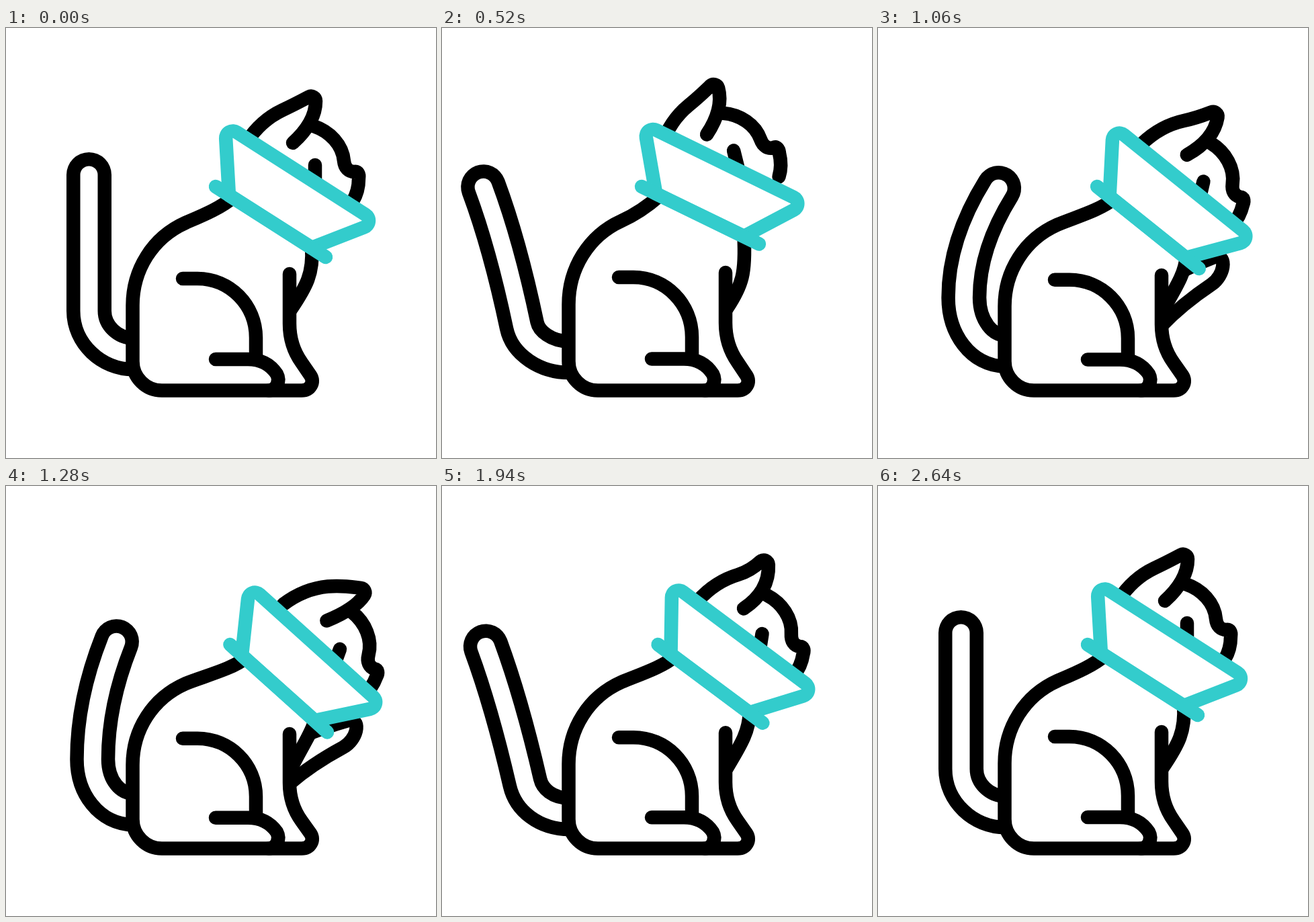
Write an HTML page with a canvas that moves like this. It is 640 by 640 pixels and loops after 2.86 s.

```html
<!DOCTYPE html>
<html>
<head>
<meta charset="utf-8">
<style>
  html, body { margin: 0; width: 100%; height: 100%; overflow: hidden; background: #fff; }
  canvas { display: block; }
</style>
</head>
<body>
<canvas id="stage" width="640" height="640"></canvas>
<script>
const ctx = document.getElementById('stage').getContext('2d');
const LOOP = 2860, LINE = 20.5, TEAL = '#33cccc';

// Key points as [time, value]; every other measure is derived from these four
const headTurn = [[205, 0], [560, -14.5], [740, -10], [840, 1], [1280, 20], [1760, 24], [2180, -14], [2640, 0]];
const earFlop = [[205, 1], [540, 0], [840, -11], [1280, 9], [1680, 14], [2000, -12], [2240, -9], [2640, 1]];
const tailSway = [[205, 0], [560, -64], [740, -42], [840, 50], [980, 58], [1280, 41], [1680, -1], [2040, -68], [2240, -42], [2640, 0]];
const pawTurn = [[640, 100], [840, -30], [1280, -22], [1680, 0], [1960, 100]];

// Monotone cubic interpolation, flat at both ends
function sample(keys, t) {
  const last = keys.length - 1;
  if (t <= keys[0][0]) return keys[0][1];
  if (t >= keys[last][0]) return keys[last][1];
  const i = keys.findIndex(k => k[0] > t) - 1;
  const rate = n => (keys[n + 1][1] - keys[n][1]) / (keys[n + 1][0] - keys[n][0]);
  const slope = n => {
    if (n === 0 || n === last) return 0;
    const a = rate(n - 1), b = rate(n);
    return a * b > 0 ? 2 * a * b / (a + b) : 0;
  };
  const [[t0, v0], [t1, v1]] = keys.slice(i, i + 2);
  const span = t1 - t0, u = (t - t0) / span, step = v1 - v0;
  const m0 = slope(i) * span, m1 = slope(i + 1) * span;
  return v0 + u * (m0 + u * (3 * step - 2 * m0 - m1 + u * (m0 + m1 - 2 * step)));
}

function stroke(color = '#000', width = LINE) {
  ctx.strokeStyle = color;
  ctx.lineWidth = width;
  ctx.stroke();
}
function fillWhite() {
  ctx.fillStyle = '#fff';
  ctx.fill();
}
function start(x, y) {
  ctx.beginPath();
  ctx.moveTo(x, y);
}
function placed(x, y, degrees, draw) {
  ctx.save();
  ctx.translate(x, y);
  ctx.rotate(degrees * Math.PI / 180);
  draw();
  ctx.restore();
}

function drawTail(sway, head) {
  const base = 485 - .06 * sway - .08 * head;
  const kneeX = 123.5 + .03 * sway + .2 * head, kneeY = 421 - .35 * sway;
  const bendX = 123.5 + .27 * sway - .0035 * sway * sway, bendY = 322;
  const reach = .55 * (base - kneeY) / (kneeY - bendY);
  start(190, base);
  ctx.bezierCurveTo(154, base, kneeX + (kneeX - bendX) * reach, kneeY + (kneeY - bendY) * reach, kneeX, kneeY);
  ctx.quadraticCurveTo(bendX, bendY, 123.5 + sway, 218.5 + .2 * head + .0055 * sway * sway);
  // The round inner end lies under the body
  stroke('#000', 67);
  stroke('#fff', 26);
}

// The paw grows out of the leg as it swings up
function drawPaw(turn) {
  const size = Math.min(1, 1 - turn / 100);
  if (size <= 0) return;
  placed(421, 440, turn, () => {
    const s = (...values) => values.map(v => v * size);
    start(...s(0, 3));
    ctx.quadraticCurveTo(...s(41, -11, 94, -17));
    ctx.bezierCurveTo(...s(117, -20, 134, -44, 119, -51));
    ctx.quadraticCurveTo(...s(74, -56, 24, -55));
    fillWhite();
    stroke();
  });
}

function drawBody(cx, cy, collar, head) {
  const a = collar * Math.PI / 180, cos = Math.cos(a), sin = Math.sin(a);
  const onCollar = (x, y) => [cx + x * cos - y * sin, cy + x * sin + y * cos];
  const squash = 1 - collar * .0018;
  const Y = y => 540 - (540 - y) * squash;

  const [chestX, chestY] = onCollar(143, 90);
  const lean = .32 * Math.max(0, head);
  const chest = () => {
    start(chestX, chestY);
    ctx.bezierCurveTo(chestX + 3 - lean, 365, 447 - lean, Y(385), 424, Y(419));
  };
  chest();
  ctx.lineTo(422, Y(365));
  fillWhite();
  chest();
  stroke();

  const [neckX, neckY] = onCollar(26, 16);
  start(neckX, neckY);
  ctx.bezierCurveTo(neckX - 18, neckY + 16, 290, Y(280), 267, Y(290));
  ctx.bezierCurveTo(218, Y(312), 188.5, Y(360), 188.5, Y(413));
  ctx.lineTo(188.5, 496);
  ctx.bezierCurveTo(188.5, 520, 208, 539.5, 232, 539.5);
  ctx.lineTo(440, 539.5);
  ctx.bezierCurveTo(453, 539.5, 460, 527, 453, 517);
  ctx.lineTo(440, Y(498));
  ctx.bezierCurveTo(430, Y(484), 422, Y(466), 422, Y(440));
  ctx.lineTo(422, Y(366));
  fillWhite();
  stroke();

  start(263, Y(373));
  ctx.lineTo(285, Y(373));
  ctx.bezierCurveTo(333, Y(373), 372, Y(412), 372, Y(461));
  ctx.lineTo(372, Y(488));
  stroke();

  start(312, Y(493));
  ctx.lineTo(360, Y(493));
  ctx.bezierCurveTo(382, Y(493), 395, Y(503), 403, 515);
  ctx.bezierCurveTo(409, 526, 402, 539.5, 391, 539.5);
  stroke();
}

// Drawn around the eye
function drawHead(flop) {
  const tipX = flop, tipY = flop * 1.05 - 108, bendX = -32, bendY = -89.5;
  start(-102, -34);
  ctx.bezierCurveTo(-87, -57, -69, -72, -49, -81.5);
  ctx.quadraticCurveTo(bendX, bendY, bendX + (tipX - bendX) * .6, bendY + (tipY - bendY) * .6);
  ctx.arcTo(tipX, tipY, 1, -64, 7);
  ctx.quadraticCurveTo(1, -64, -33, -33);
  stroke();

  start(-2, -58);
  ctx.bezierCurveTo(22, -50, 41, -30, 43, -6);
  ctx.bezierCurveTo(44, 4, 50, 10, 58, 10);
  ctx.bezierCurveTo(64, 9, 66, 14, 65, 20);
  ctx.bezierCurveTo(65, 34, 62, 44, 56, 54);
  stroke();

  start(0, 0);
  ctx.lineTo(0, 26);
  stroke();
}

// Drawn from the back end of the neck band
function drawCollar() {
  start(20, 13);
  ctx.arcTo(14, -92, 240.5, 53, 10.5);
  ctx.arcTo(240.5, 53, 143, 91, 10.5);
  ctx.lineTo(143, 91);
  ctx.closePath();
  fillWhite();
  stroke(TEAL);
  start(0, 0);
  ctx.lineTo(164, 105);
  stroke(TEAL);
}

function render(now) {
  const t = now % LOOP;
  const head = sample(headTurn, t), collar = .47 * head;
  const collarX = 312 + 1.07 * head, collarY = 236;
  const eyeX = 460 + 1.85 * head, eyeY = 204 + 1.7 * head + .012 * head * head;

  ctx.fillStyle = '#fff';
  ctx.fillRect(0, 0, 640, 640);
  ctx.lineCap = ctx.lineJoin = 'round';
  drawTail(sample(tailSway, t), head);
  drawPaw(sample(pawTurn, t));
  drawBody(collarX, collarY, collar, head);
  placed(eyeX, eyeY, head, () => drawHead(sample(earFlop, t)));
  placed(collarX, collarY, collar, drawCollar);
  requestAnimationFrame(render);
}
requestAnimationFrame(render);
</script>
</body>
</html>
```
